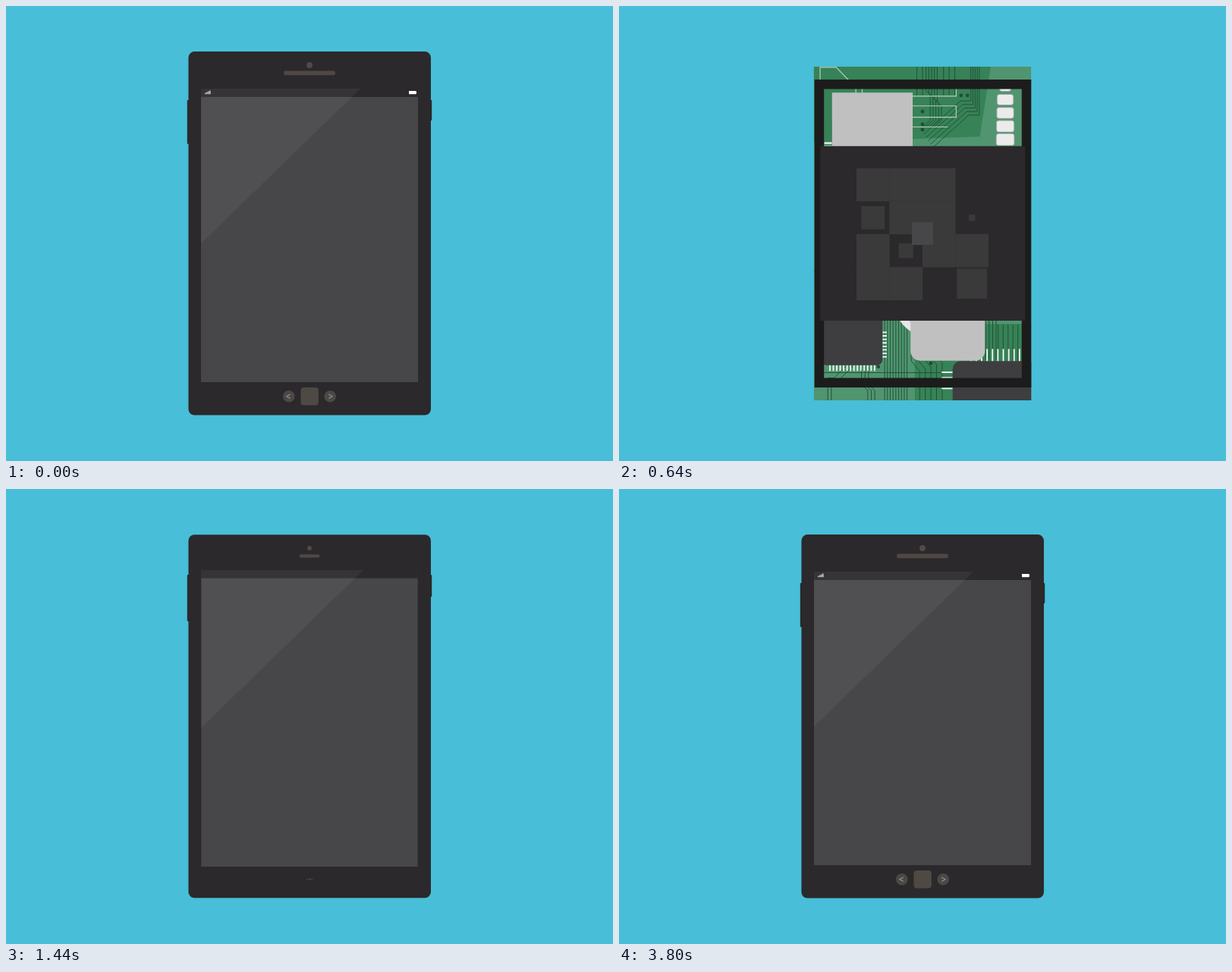
Write an HTML page with a canvas that moves like this. It is 800 by 600 pixels and loops after 3.92 s.

```html
<!DOCTYPE html>
<html lang="en">
<head>
<meta charset="utf-8">
<title>Tablet assembly</title>
<style>
html, body { margin: 0; width: 100%; height: 100%; overflow: hidden; background: #48bed8; }
canvas { display: block; width: 800px; height: 600px; }
</style>
</head>
<body>
<canvas id="stage" width="800" height="600"></canvas>
<script>
const c = document.getElementById('stage').getContext('2d');
const LOOP = 3920, STEP = 40;
const BODY = '#2b292c', CHIP = '#3e3d40', LID = '#c0c0c0', TRACE = '#1f4f35';
let t = 0;

// Smooth curve through time/value pairs, flat at turning points.
function key(...p) {
  const n = p.length / 2;
  if (t <= p[0]) return p[1];
  if (t >= p[2 * n - 2]) return p[2 * n - 1];
  const slope = i => (p[2 * i + 3] - p[2 * i + 1]) / (p[2 * i + 2] - p[2 * i]);
  const tangent = i => {
    if (i === 0 || i === n - 1) return 0;
    const a = slope(i - 1), b = slope(i);
    return a * b <= 0 ? 0 : 2 * a * b / (a + b);
  };
  let i = 0;
  while (t > p[2 * i + 2]) i++;
  const d = p[2 * i + 2] - p[2 * i], u = (t - p[2 * i]) / d;
  const v = u * u * (3 - 2 * u);
  return p[2 * i + 1] * (1 - v) + p[2 * i + 3] * v
    + d * u * (1 - u) * ((1 - u) * tangent(i) - u * tangent(i + 1));
}
const grow = (from, to) => key(from, 0, to, 1);

function box(x, y, w, h, color, r = 0) {
  if (w <= 0 || h <= 0) return;
  c.fillStyle = color;
  c.beginPath();
  c.roundRect(x, y, w, h, Math.min(r, w / 2, h / 2));
  c.fill();
}
const mid = (x, y, w, h, color, r) => box(x - w / 2, y - h / 2, w, h, color, r);

function dot(x, y, r, color) {
  c.fillStyle = color;
  c.beginPath();
  c.arc(x, y, Math.max(r, 0), 0, 7);
  c.fill();
}
function poly(color, ...p) {
  c.fillStyle = color;
  c.beginPath();
  for (let i = 0; i < p.length; i += 2) c.lineTo(p[i], p[i + 1]);
  c.fill();
}
function line(d, color, w = 1) {
  c.strokeStyle = color;
  c.lineWidth = w;
  c.stroke(new Path2D(d));
}
function draw(d, length, part, color) {
  c.setLineDash([length * part, length * 2]);
  line(d, color, 1.3);
  c.setLineDash([]);
}
function pins(x, y, n, gap, length, vertical) {
  for (let i = 0; i < n; i++) {
    if (vertical) box(x + i * gap, y, 2, length, '#f4f8f4');
    else box(x, y + i * gap, length, 2, '#f4f8f4');
  }
}
function popped(x, y, s, fn) {
  c.save();
  c.translate(x, y);
  c.scale(s, s);
  c.translate(-x, -y);
  fn();
  c.restore();
}

function traces() {
  for (let i = 0; i < 5; i++) {
    line(`M${481 - 3 * i} 62V${131 - 5 * i}h-15l-52 47`, TRACE);
    line(`M${405 + i * 4} 62V${96 + i * 4}l6 6v${36 - 4 * i}l-10 10`, TRACE);
    line(`M${463 + i * 5} ${350 - i * 8}l22 24V480`, TRACE);
    line(`M${508 + i * 7} 430V483`, TRACE);
    line(`M${384 + i * 8} 410V${482 - i * 3}l12 14V538`, TRACE);
  }
  for (let i = 0; i < 9; i++) line(`M${346 + i * 4} 400V538`, TRACE);
  for (const x of [392, 400, 430, 438, 446]) line(`M${x} 62V103`, TRACE);
  for (const x of [313, 318, 323]) line(`M${x} 490v25l9 9v14`, TRACE);
  line('M265 538V506H274L292 488M270 538V510H280L304 486', TRACE);
  line('M245 367L299 313V245M245 355L290 308M310 330L334 291V250', TRACE);
  line('M530 205V262M254 498.5H432M455 300H481V360L463 376', TRACE);
  const dots = [422, 87, 455, 103, 464, 103, 400, 126, 400, 144, 400, 152, 442, 190,
    290, 308, 299, 308, 323, 291, 334, 291, 340, 274, 297, 374, 530, 205, 530, 262,
    530, 297, 530, 307, 530, 316, 532, 394, 538, 401, 471, 371, 476, 387, 463, 350,
    398, 469, 412, 485, 337, 490];
  for (let i = 0; i < dots.length; i += 2) dot(dots[i], dots[i + 1], 2.6, TRACE);
}

function board() {
  c.save();
  c.beginPath();
  c.rect(245, 62, 310, 476);
  c.clip();
  box(245, 62, 310, 476, '#509570');
  const edge = key(480, 478, 720, 504);
  poly('#378257', 245, 62, edge, 62, key(480, 418, 720, 504), key(480, 138, 720, 170), 245, 170);
  box(389, 429, 166, 109, '#378257');
  traces();

  const ink = '#b9cdbd', part = key(160, 0, 480, .62, 760, 1);
  draw('M254 240V63H277L305 92V150', 300, grow(120, 440), ink);
  draw('M314 150V92L448 91V104H330V118H448V134H330V148H448V170', 790, part, ink);

  // Main chip with its sliding lid
  popped(329, 187, grow(160, 360), () => {
    pins(260, 170, 14, 5, 12, false);
    pins(280, 240, 13, 5, 12, true);
    box(271, 130, 115, 114, CHIP, 8);
    box(271, key(400, 146, 480, 131, 720, 92), 115, key(400, 83, 480, 98, 720, 115), LID);
  });

  popped(485, 235, grow(200, 400), () => {
    for (const y of [208, 252]) pins(468, y, 4, 9, 10, true);
    for (const x of [458, 502]) pins(x, 220, 5, 7, 8, false);
    box(462, 213, 45, 44, CHIP, 4);
  });

  popped(411, 397, grow(240, 440), () => {
    dot(411, 397, 51, '#e6e6e6');
    dot(411, 397, 41, '#c4c4c4');
    dot(411, 397, 36, '#e6e6e6');
  });

  popped(300, 446, grow(160, 380), () => {
    const out = 10 * grow(460, 680);
    pins(267, 487, 14, 4.9, out, true);
    pins(338, 440, 8, 5, out + 2, false);
    pins(268, 395, 8, 9, 9, true);
    pins(249, 429, 10, 5, 8, false);
    box(255, 402, 88, 86, CHIP, 8);
  });

  const reach = key(360, 0, 480, 10, 720, 20);
  pins(468, 483 - reach, 10, 7.7, reach, true);
  pins(444 - reach * .9, 497, 4, 7.7, key(360, 0, 480, 5, 720, 18), false);
  popped(500, 510, grow(180, 400), () => box(443, 482, 120, 80, CHIP, 12));

  for (let i = 0; i < 6; i++) {
    const s = key(300 - i * 35, 0, 520 - i * 25, .65, 800 - i * 30, 1);
    const w = (i ? 27 : 20) * s, h = 18 * s;
    mid(518, 90 + i * 19, w, h, '#9ea6a0', 4);
    mid(518, 90 + i * 19, w - 2, h - 2, '#ebebeb', 3);
  }
  c.restore();

  const rh = key(300, 0, 480, 258, 720, 476);
  if (rh > 0) {
    const b = Math.min(key(300, 4, 480, 11, 720, 14), rh / 2);
    c.strokeStyle = '#1c1c1c';
    c.lineWidth = b;
    c.strokeRect(246 + b / 2, 300 - rh / 2 + b / 2, 309 - b, rh - b);
  }
  const pw = key(340, 0, 480, 64, 720, 114), ph = key(340, 0, 480, 75, 720, 100);
  box(436 - pw / 2, 481.5 - ph, pw, ph, LID, 14);
}

// Sixteen tiles fill a square, in this order of cells.
const ORDER = [1, 5, 11, 8, 10, 2, 12, 13, 6, 0, 15, 4, 9, 7, 3, 14];
function tiles() {
  popped(400, 300, key(800, 1, 1120, .98), () => {
    ORDER.forEach((cell, i) => {
      const start = i < 2 ? 280 : 290 + i * 24;
      const size = 47.3 * (i > 13 ? key(start, 0, 780, .985, 880, 1) : grow(start, start + 135));
      mid(329.5 + cell % 4 * 47, 230.5 + (cell >> 2) * 47, size, size, '#3a3a3a');
    });
  });
}

function body() {
  const w = key(340, 0, 480, 113, 720, 334, 800, 328, 960, 318, 1120, 320, 1240, 319.5);
  const h = key(340, 0, 480, 215, 800, 279, 1120, 480, 1200, 486, 1320, 477, 1480, 479.5);
  mid(400.2, 299.8, w, h, BODY, key(880, 0, 1120, 8));
}

function sides() {
  const ly = key(1080, 450, 1120, 419, 1360, 136, 1560, 158, 1920, 152, 2280, 153);
  const lh = key(1080, 0, 1120, 3, 1400, 62, 1600, 56, 1920, 58);
  const ry = key(1160, 400, 1400, 126, 1600, 142, 1920, 135.7, 2280, 137.5);
  const rh = key(1160, 0, 1440, 29, 1640, 25, 1920, 27);
  mid(240, ly, 2.4, lh, BODY, 1);
  mid(560, ry, 2.4, rh, BODY, 1);
}

function screen() {
  const w = key(420, 0, 480, 30, 800, 31, 1040, 300, 1120, 292, 1320, 284, 1480, 286);
  const h = key(420, 0, 480, 8, 800, 65, 1120, 180, 1400, 392, 1640, 381, 1920, 384.5, 2240, 387);
  const y = key(1120, 300, 1480, 302.4), x0 = 400 - w / 2, y0 = y - h / 2;
  if (w <= 0) return;
  c.save();
  c.beginPath();
  c.rect(x0, y0, w, h);
  c.clip();
  box(x0, y0, w, h, '#474749');
  box(x0, y0, w, key(1240, 0, 1480, 12, 1640, 10.5, 1920, 11), BODY);
  const g = key(860, 0, 1120, 108, 1440, 214, 1640, 206, 1920, 208, 2240, 210);
  poly('rgba(255,255,255,.05)', x0, y0, x0 + g, y0, x0, y0 + g * .973);
  c.restore();

  // Status icons
  const base = y0 + 7.4;
  for (let i = 0; i < 4; i++) {
    const bh = (1.8 + i) * key(1560 + i * 60, 0, 1760 + i * 40, 1.1, 1920, 1,
      2680, i > 1 ? .88 : 1, 2960, 1);
    box(262 + i * 2, base - bh, 1.6, bh, '#c4c4c4');
  }
  const level = key(1720, 0, 1920, 4, 2680, 7, 3360, 9);
  box(531, base - 4.4, level, 4.4, '#fff', .4);
  box(540, base - 3.8, grow(3400, 3720), 3.2, '#fff');
}

function chevron(x, dir) {
  line(`M${x + 2.3 * dir} 512l${-4.8 * dir} 2.8l${4.8 * dir} 2.8`, '#96918a', 1.1);
}

function controls() {
  const pop = d => key(1360 + d, 0, 1560 + d, 1.12, 1740 + d, .96, 1920, 1.045, 2200, 1);
  dot(400, 78, 3.9 * key(1320, 0, 1520, 1.15, 1760, 1), '#514a46');
  mid(400, 88.4, 68 * pop(0), 5.6 * grow(1360, 1480), '#4f4844', 2.8);
  const s = pop(40), home = 23.4 * s;
  mid(400.2, 514.7, home, home, '#4f4944', 4);
  [[-1, '<'], [1, '>']].forEach(([side]) => {
    const x = 400 + 27.2 * side * s;
    dot(x, 514.8, 7.8 * s, '#4c4846');
    if (s > .02) popped(x, 514.8, s, () => chevron(x + .4 * side, -side));
  });
}

function render() {
  c.fillStyle = '#48bed8';
  c.fillRect(0, 0, 800, 600);
  c.save();
  const zoom = key(40, .4, 480, .745, 760, 1);
  c.translate(400, 300);
  c.scale(zoom, zoom);
  c.translate(-400, -300);
  if (t < 1120) popped(400, 300, grow(40, 240), board);
  sides();
  body();
  if (t < 1400) tiles();
  screen();
  controls();
  c.restore();
}

function tick(now) {
  t = Math.floor(now % LOOP / STEP) * STEP;
  if (t === 0) t = LOOP;
  render();
  requestAnimationFrame(tick);
}
tick(performance.now());
</script>
</body>
</html>
```
